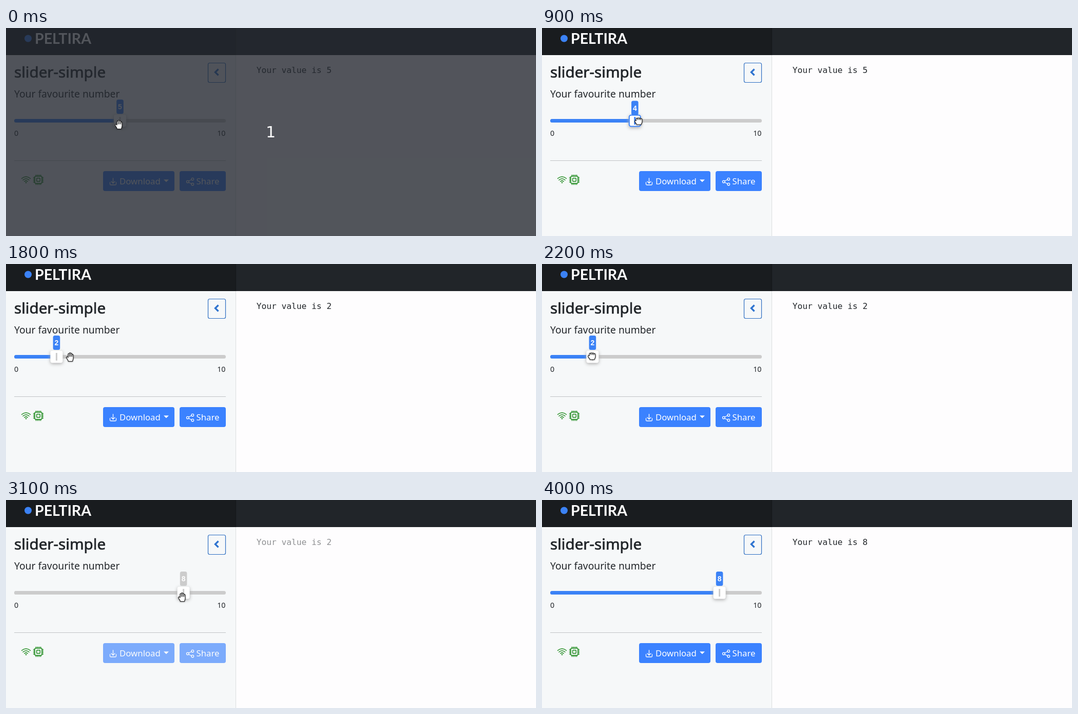
These frames come from a looping animation (1032x407 px, 4.3 s). An HTML page:

```html
<!DOCTYPE html>
<html lang="en">
<head>
<meta charset="utf-8">
<title>Slider demo</title>
<style>
  html, body { margin: 0; width: 100%; height: 100%; overflow: hidden; background: #fefdfe; }
  svg { display: block; width: 1032px; height: 407px; }
  text { font-family: "Noto Sans", "Open Sans", sans-serif; fill: #212529; white-space: pre; }
  .brand { font: 700 28.5px Lato, sans-serif; fill: #fff; }
  .title { font-size: 29.6px; stroke: #212529; stroke-width: .7px; }
  .label { font-size: 19.25px; }
  .limit { font-size: 14.3px; }
  .button { font-size: 16.8px; fill: #fff; }
  .output { font: 16.2px "DejaVu Sans Mono", monospace; }
  .value { font: 700 14px "Liberation Sans", Arial, sans-serif; fill: #fff; text-anchor: middle; }
  .count { font: 30px "DejaVu Sans", sans-serif; fill: #fff; text-anchor: middle; }
  .line { fill: none; stroke-linecap: round; stroke-linejoin: round; }
  #knob { filter: drop-shadow(0 2px 3px #aaa); }
  .pointer { filter: drop-shadow(0 1px 1px #0005); }
</style>
</head>
<body>
<svg viewBox="0 0 1032 407">
  <rect width="1032" height="407" fill="#fefdfe"/>
  <rect y="53" width="447" height="354" fill="#f6f8f9"/>
  <path d="M447.5 53V407" stroke="#dcdee0"/>
  <rect width="1032" height="53" fill="#212529"/>
  <rect width="447" height="53" fill="#191c1f"/>
  <path d="M447.5 0V53M0 52.5H447" stroke="#14171a"/>

  <circle cx="43" cy="20.5" r="7" fill="#3b82f6"/>
  <text class="brand" x="56" y="31">PELTIRA</text>

  <text class="title" x="16" y="97">slider-simple</text>
  <rect x="393.5" y="68.5" width="34" height="38" rx="3" fill="none" stroke="#2a6cc2" stroke-width="1.2"/>
  <path d="M413.5 80.5L407.5 86.5L413.5 92.5" fill="none" stroke="#2f74d0" stroke-width="3.4"/>
  <text class="label" x="16" y="136">Your favourite number</text>

  <rect x="16" y="178" width="412" height="7" rx="3.5" fill="#ccc"/>
  <rect id="fill" x="16" y="178" height="7" rx="3.5"/>
  <g id="thumb">
    <rect id="knob" x="-12" y="169.5" width="24" height="24" rx="4" fill="#fff"/>
    <rect id="ring" x="-11" y="170.5" width="22" height="22" rx="3.5" fill="none" stroke="#3b82f6" stroke-width="2"/>
    <rect id="tick" x="-1.5" y="174" width="3" height="15"/>
    <g id="badge">
      <rect id="badgeBox" x="-6.8" y="140" width="13.6" height="28" rx="3.5"/>
      <text id="badgeText" class="value" y="159"></text>
    </g>
  </g>
  <text class="limit" x="16" y="211">0</text>
  <text class="limit" x="427.5" y="211" text-anchor="end">10</text>
  <path d="M16 259.5H428" stroke="#bfc2c4"/>

  <g class="line" stroke="#1f8a1f" stroke-width="1.5">
    <path d="M30.5 294.5Q39 287.5 47.5 294.5M33 297.5Q39 292.5 45 297.5M35.8 300.2Q39 297.5 42.2 300.2"/>
    <circle cx="39" cy="302.5" r=".6"/>
    <rect x="56" y="290" width="14" height="14" rx="2"/>
    <rect x="59.7" y="293.7" width="6.6" height="6.6" rx="1"/>
    <path d="M58.5 290V287.5M61.5 290V287.5M64.5 290V287.5M67.5 290V287.5M58.5 306.5V304M61.5 306.5V304M64.5 306.5V304M67.5 306.5V304M56 292.5H53.5M56 295.5H53.5M56 298.5H53.5M56 301.5H53.5M72.5 292.5H70M72.5 295.5H70M72.5 298.5H70M72.5 301.5H70"/>
  </g>

  <g id="buttons">
    <rect x="189" y="280" width="139" height="39" rx="4" fill="#3b82ff"/>
    <rect x="338" y="280" width="90" height="39" rx="4" fill="#3b82ff"/>
    <g class="line" stroke="#fff" stroke-width="1.3">
      <path d="M202.5 302V305.5Q202.5 307 204 307H213Q214.5 307 214.5 305.5V302M208.5 294V303.5M205 300.3L208.5 303.7L212 300.3"/>
      <path d="M355.5 299.5L361.5 296.5M355.5 302L361.5 305"/>
      <circle cx="353.8" cy="300.7" r="2.3"/>
      <circle cx="363.3" cy="295.7" r="2.3"/>
      <circle cx="363.3" cy="305.7" r="2.3"/>
    </g>
    <text class="button" x="221" y="306">Download</text>
    <path d="M307 296.5H317L312 301.5Z" fill="#fff"/>
    <text class="button" x="370.5" y="306">Share</text>
  </g>

  <text id="output" class="output" x="487.8" y="88"></text>

  <g id="countdown">
    <rect width="1032" height="407" fill="#242830" fill-opacity=".79"/>
    <text class="count" x="515.5" y="214">1</text>
  </g>

  <g id="cursor">
    <g id="grab" class="pointer line" stroke="#1b1b1b" stroke-width="1.2">
      <path fill="#fff" d="M-3.5 8.5C-4 5-8 2-7.5 .5C-7-1-5-.5-4 1V-5.5C-4-7.5-1.5-7.5-1.5-5.5V-7C-1.5-9 1-9 1-7V-6C1-8 3.5-8 3.5-6V-4C3.5-5.5 6-5.5 6-4V2C6 5 5 6 4.5 8.5Z"/>
      <path d="M-1.5-5.5V-1M1-6V-1M3.5-4V-1"/>
    </g>
    <g id="fist" class="pointer line" stroke="#1b1b1b" stroke-width="1.2">
      <path fill="#fff" d="M-3.5 7C-4 5-7.5 2.5-7.3 .3C-7.2-1.3-5.3-1.5-4.8-.5V-3.5C-4.8-6-2-6.2-1.8-4.5C-1.8-6.8 1-6.8 1.2-4.5C1.4-6.4 4-6.2 4-4C4.3-5.3 7-5 7-2.8V1.5C7 4 5.5 5 5 7Z"/>
      <path d="M-1.8-4.5V-2.5M1.2-4.5V-2.5M4-4V-2.2"/>
    </g>
    <path id="arrow" class="pointer" d="M.5 .5V16L4 12.7L6.3 18.2L9 17L6.7 11.7H11.3Z" fill="#111" stroke="#fff"/>
  </g>
</svg>
<script>
const LOOP = 4300, STEP = 100;
const TRACK_LEFT = 16, UNIT = 41.2;
const BLUE = "#3b82f6", GREY = "#ccc";
const $ = id => document.getElementById(id);

// Pointer stops: time, x, y and, where it changes, the shape.
const stops = [
  [0, 220, 189, "grab"], [200, 218, 188], [300, 217, 186], [600, 212, 183],
  [800, 210, 183, "fist"], [900, 188, 182], [1000, 160, 181], [1100, 135, 180],
  [1200, 115, 180], [1300, 106, 180], [1500, 105, 180],
  [1600, 107, 180, "grab"], [1800, 125, 182], [1900, 146, 185],
  [2200, 97, 180, "fist"], [2500, 130, 183], [2600, 215, 187], [2700, 301, 190],
  [2800, 332, 190], [2900, 343, 191], [3100, 343, 190, "grab"],
  [3200, 300, 160, "arrow"], [3300, 225, 122], [3400, 167, 87], [3500, 137, 55],
  [3700, 120, 42], [3800, 95, 25], [3900, 72, 11], [4000, 72, 11, "none"]
];
const drags = [[800, 1600], [2300, 3100]];
const runs = [[1600, 1800], [3100, 3300]];

const within = (t, spans) => spans.some(([from, to]) => t >= from && t < to);
const show = (id, on) => $(id).setAttribute("visibility", on ? "visible" : "hidden");

function pointerAt(t) {
  const past = stops.filter(s => s[0] <= t);
  const [, x, y] = past[past.length - 1];
  const shape = past.reduce((last, s) => s[3] || last, "grab");
  return { x, y, shape };
}

function valueAt(t) {
  if (t < 800) return 5;
  const drag = drags.filter(d => d[0] <= t).pop();
  const { x } = pointerAt(Math.min(t, drag[1] - STEP));
  return Math.round((x - TRACK_LEFT) / UNIT);
}

function render(time) {
  const t = Math.floor(time % LOOP / STEP) * STEP;
  const pointer = pointerAt(t), value = valueAt(t);
  const pressed = within(t, drags), busy = within(t, runs);
  const color = busy ? GREY : BLUE;

  $("fill").setAttribute("width", value * UNIT);
  $("fill").setAttribute("fill", color);
  $("thumb").setAttribute("transform", `translate(${TRACK_LEFT + value * UNIT} 0)`);
  show("ring", pressed);
  $("tick").setAttribute("fill", pressed ? BLUE : GREY);
  $("badge").setAttribute("transform", `translate(0 ${pressed ? 2.5 : 0})`);
  $("badgeBox").setAttribute("fill", color);
  $("badgeText").textContent = value;
  $("buttons").setAttribute("opacity", busy ? 0.65 : 1);

  const result = t < 1800 ? 5 : t < 3300 ? 2 : 8;
  $("output").textContent = `Your value is ${result}`;
  $("output").setAttribute("opacity", busy ? 0.5 : 1);

  $("cursor").setAttribute("transform", `translate(${pointer.x} ${pointer.y})`);
  for (const shape of ["grab", "fist", "arrow"]) show(shape, shape === pointer.shape);
  show("countdown", t < STEP);
}

const start = performance.now();
function tick() {
  render(performance.now() - start);
  requestAnimationFrame(tick);
}
tick();
</script>
</body>
</html>
```
